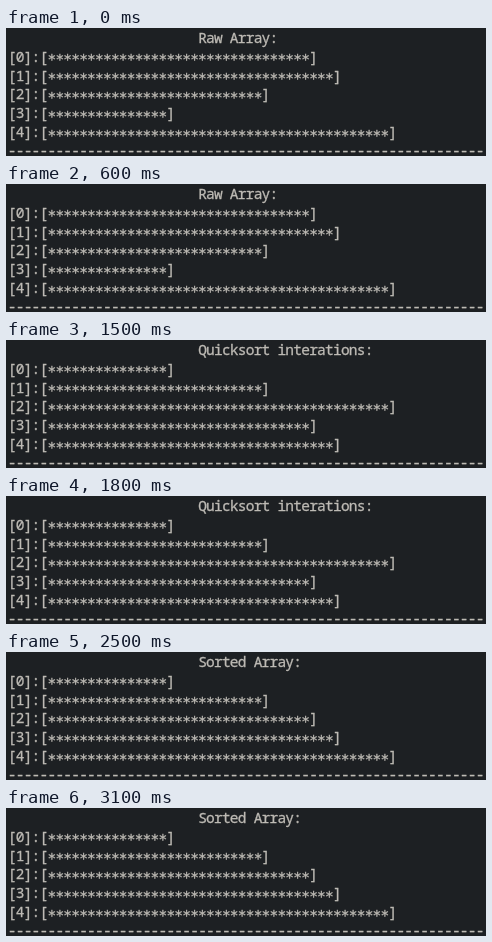
Write an HTML page with a canvas that moves like this. It is 480 px wide and 128 px high and loops after 3.5 s.

```html
<!DOCTYPE html>
<html lang="en">
<head>
<meta charset="utf-8">
<title>Quicksort</title>
<style>
  html, body { margin: 0; width: 100%; height: 100%; overflow: hidden; background: #1d2023; }
  canvas { display: block; }
</style>
</head>
<body>
<canvas id="stage" width="480" height="128"></canvas>
<script>
const ctx = document.getElementById("stage").getContext("2d");
const LOOP = 3500;
const CELL = 7.93, LEFT = 2.2, ROW = 18.8, BASE = 15;
const TEXT_FONT = '14.5px "Noto Sans Mono", monospace';
const STAR_FONT = '14.5px "DejaVu Sans Mono", monospace';
const INK = "#bebbb5";

const raw = [33, 36, 27, 15, 43];
const split = [15, 27, 43, 33, 36];
const sorted = [...raw].sort((a, b) => a - b);
const steps = [
  { at: 0, title: "Raw Array:", values: raw },
  { at: 1000, title: "Quicksort interations:", values: raw },
  { at: 1500, title: "Quicksort interations:", values: split },
  { at: 2000, title: "Quicksort interations:", values: sorted, edge: true },
  { at: 2500, title: "Sorted Array:", values: sorted }
];

// Slightly thickened character, centred in its terminal cell
function mark(ch, col, y) {
  const x = LEFT + (col + 0.5) * CELL;
  ctx.fillText(ch, x, y);
  ctx.strokeText(ch, x, y);
}

function write(text, col, y) {
  ctx.font = TEXT_FONT;
  [...text].forEach((ch, i) => mark(ch, col + i, y));
}

// Repeated mark, vertically centred on y
function fillRun(ch, font, count, col, y) {
  ctx.font = font;
  const m = ctx.measureText(ch);
  const base = y + (m.actualBoundingBoxAscent - m.actualBoundingBoxDescent) / 2;
  for (let i = 0; i < count; i++) mark(ch, col + i, base);
}

function draw(step) {
  ctx.fillStyle = "#1d2023";
  ctx.fillRect(0, 0, 480, 128);
  if (step.edge) {
    ctx.fillStyle = "#e4e4e0";
    ctx.fillRect(189, 0, 181, 1);
  }
  ctx.fillStyle = ctx.strokeStyle = INK;
  ctx.lineWidth = 0.3;
  ctx.textAlign = "center";
  ctx.textBaseline = "alphabetic";
  write(step.title, 24, BASE);
  step.values.forEach((value, i) => {
    const y = BASE + (i + 1) * ROW;
    write(`[${i}]:[`, 0, y);
    fillRun("*", STAR_FONT, value, 5, y - 4);
    write("]", 5 + value, y);
  });
  fillRun("-", TEXT_FONT, 60, 0, 123.6);
}

let shown = null;
function frame() {
  const t = performance.now() % LOOP;
  const step = steps.findLast(s => s.at <= t);
  if (step !== shown) draw(shown = step);
  requestAnimationFrame(frame);
}
frame();
</script>
</body>
</html>
```
